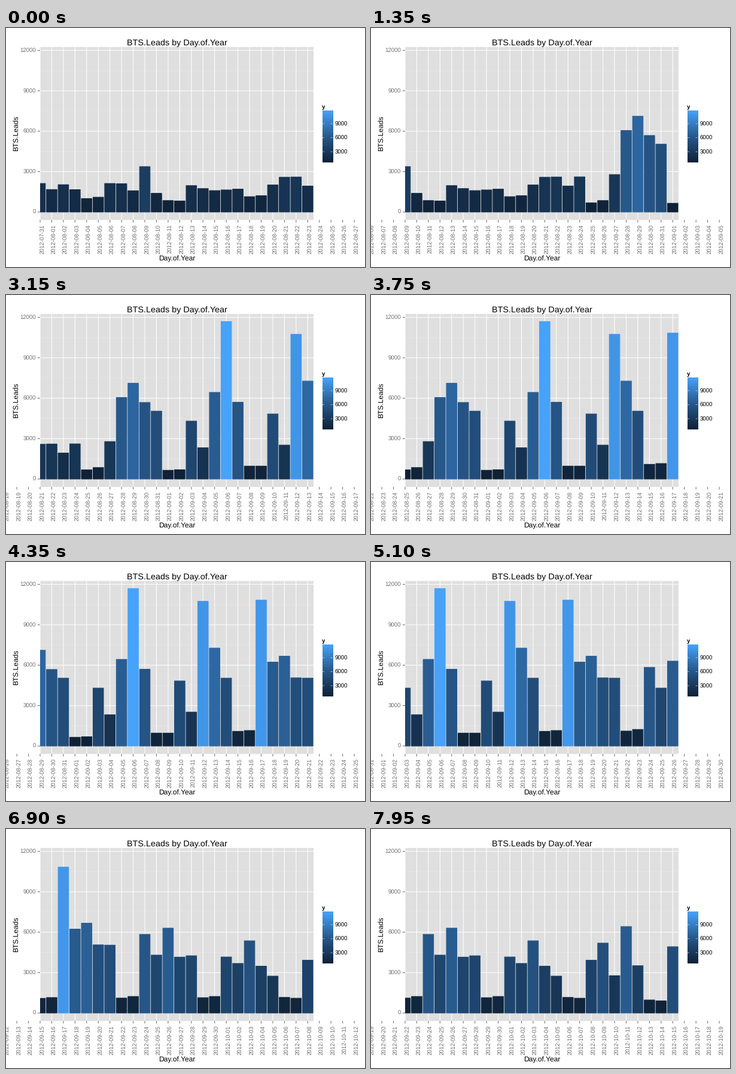
Animation, 600 px wide and 400 px high, one loop 8 s. Source, as a matplotlib script:

```python
import matplotlib.pyplot as plt
import numpy as np
from matplotlib.animation import FuncAnimation
from matplotlib.collections import LineCollection, PolyCollection
from matplotlib.colors import LinearSegmentedColormap, Normalize
from matplotlib.patches import Rectangle
from matplotlib.transforms import Affine2D

plt.rcParams["font.family"] = "Liberation Sans"
plt.rcParams["text.hinting"] = "none"

DPI = 100
PX = 72 / DPI
LEFT, RIGHT, TOP, BOTTOM = 57, 514, 31.8, 321.2
DAY_WIDTH = (RIGHT - LEFT) / 23.5
ZERO_Y, UNIT = 308, 67.65 / 3000
LINE = 1.07
GREY = "#707070"
FIRST_DAY = np.datetime64("2012-07-31")
INTERVAL, HOLD, FRAMES = 50, 3, 160

LEADS = [
    2120, 1670, 2030, 1660, 1000, 1100, 2120, 2100, 1580, 3370, 1390,
    850, 820, 1960, 1740, 1590, 1640, 1700, 1140, 1210, 2010, 2580,
    2600, 1930, 2610, 680, 850, 2780, 6050, 7110, 5680, 5040, 650,
    690, 4300, 2320, 6430, 11690, 5700, 960, 960, 4830, 2520, 10740,
    7270, 5040, 1090, 1150, 10830, 6230, 6670, 5060, 5040, 1110, 1230,
    5840, 4300, 6300, 4150, 4250, 1140, 1230, 4160, 3680, 5360, 3480,
    2740, 1160, 1100, 3920, 5190, 2770, 6420, 3510, 970, 900, 4920,
]

blues = LinearSegmentedColormap.from_list("blues", ["#0f2136", "#27598c", "#47a2fa"])
scale = Normalize(min(LEADS), max(LEADS))

fig = plt.figure(figsize=(600 / DPI, 400 / DPI), dpi=DPI, facecolor="white")
ax = fig.add_axes([0, 0, 1, 1])
ax.axis("off")


def day_x(slot):
    return LEFT + slot * DAY_WIDTH


def value_y(value):
    return ZERO_Y - value * UNIT


def write(x, y, text, size=9.6, **kw):
    return ax.text(x, y, text, fontsize=size * PX, **kw)


def lines(segments, color, width=LINE, z=2):
    group = LineCollection(segments, colors=color, linewidths=width * PX,
                           capstyle="butt", zorder=z, snap=False)
    return ax.add_collection(group, autolim=False)


panel = Rectangle((LEFT, TOP), RIGHT - LEFT, BOTTOM - TOP, color="#dfdfdf",
                  lw=0, zorder=1, snap=False)
ax.add_patch(panel)

# Grid and value axis
majors = range(0, 12001, 3000)
lines([[(LEFT, value_y(v)), (RIGHT, value_y(v))] for v in range(1500, 12000, 3000)],
      "#ebebeb", LINE / 2)
grid = lines([[(LEFT, value_y(v)), (RIGHT, value_y(v))] for v in majors]
             + [[(day_x(i), TOP), (day_x(i), BOTTOM)] for i in range(24)], "white")
grid.set_clip_path(panel)
lines([[(LEFT - 4.25, value_y(v)), (LEFT, value_y(v))] for v in majors], GREY)
for v in majors:
    write(50, value_y(v) + 3.4, str(v), color=GREY, ha="right")

# Bars, scrolled as one group
half = 0.45 * DAY_WIDTH
shapes = []
for day, value in enumerate(LEADS):
    x0, x1, y = day_x(day) - half, day_x(day) + half, value_y(value)
    shapes.append([(x0, ZERO_Y), (x0, y), (x1, y), (x1, ZERO_Y)])
colors = blues(scale(LEADS))
bars = PolyCollection(shapes, facecolors=colors, edgecolors=colors,
                      linewidths=LINE * PX, joinstyle="round", zorder=3, snap=False)
ax.add_collection(bars, autolim=False)
bars.set_clip_path(panel)

# Day axis: some labels stick out past both sides of the panel
slots = range(-3, 28)
ticks = lines([], GREY)
labels = [write(day_x(s) + 7, 328.5, "", color=GREY, rotation=90, ha="right",
                va="baseline", rotation_mode="anchor") for s in slots]

# Titles
middle = (LEFT + RIGHT) / 2
write(middle, 28.7, "BTS.Leads by Day.of.Year", 14.4, ha="center")
write(middle, 390, "Day.of.Year", 12, ha="center")
write(19.7, (TOP + BOTTOM) / 2, "BTS.Leads", 12, rotation=90, ha="center",
      va="baseline", rotation_mode="anchor")

# Colour legend
KEY_X, KEY_TOP, KEY_W, KEY_H = 528.6, 139, 17.3, 86.4
ax.imshow(np.linspace(1, 0, 256)[:, None], cmap=blues, aspect="auto", zorder=1,
          extent=(KEY_X, KEY_X + KEY_W, KEY_TOP + KEY_H, KEY_TOP))
write(528.2, 135.3, "y", weight="bold")
for v in (3000, 6000, 9000):
    y = KEY_TOP + KEY_H * (1 - scale(v))
    end, tick = KEY_X + KEY_W, KEY_W / 5
    lines([[(KEY_X, y), (KEY_X + tick, y)], [(end - tick, y), (end, y)]],
          "white", LINE / 2)
    write(550, y + 3.4, str(v))

ax.set_xlim(0, 600)
ax.set_ylim(400, 0)


def update(frame):
    start = frame // HOLD
    bars.set_transform(Affine2D().translate(-start * DAY_WIDTH, 0) + ax.transData)
    shown = [s for s in slots if start + s >= 0]
    ticks.set_segments([[(day_x(s), BOTTOM), (day_x(s), BOTTOM + 4.25)] for s in shown])
    for s, label in zip(slots, labels):
        label.set_text(str(FIRST_DAY + start + s) if s in shown else "")
    return [bars, ticks, *labels]


anim = FuncAnimation(fig, update, frames=FRAMES, interval=INTERVAL,
                     repeat=True, repeat_delay=0, blit=False)
plt.show()
```
